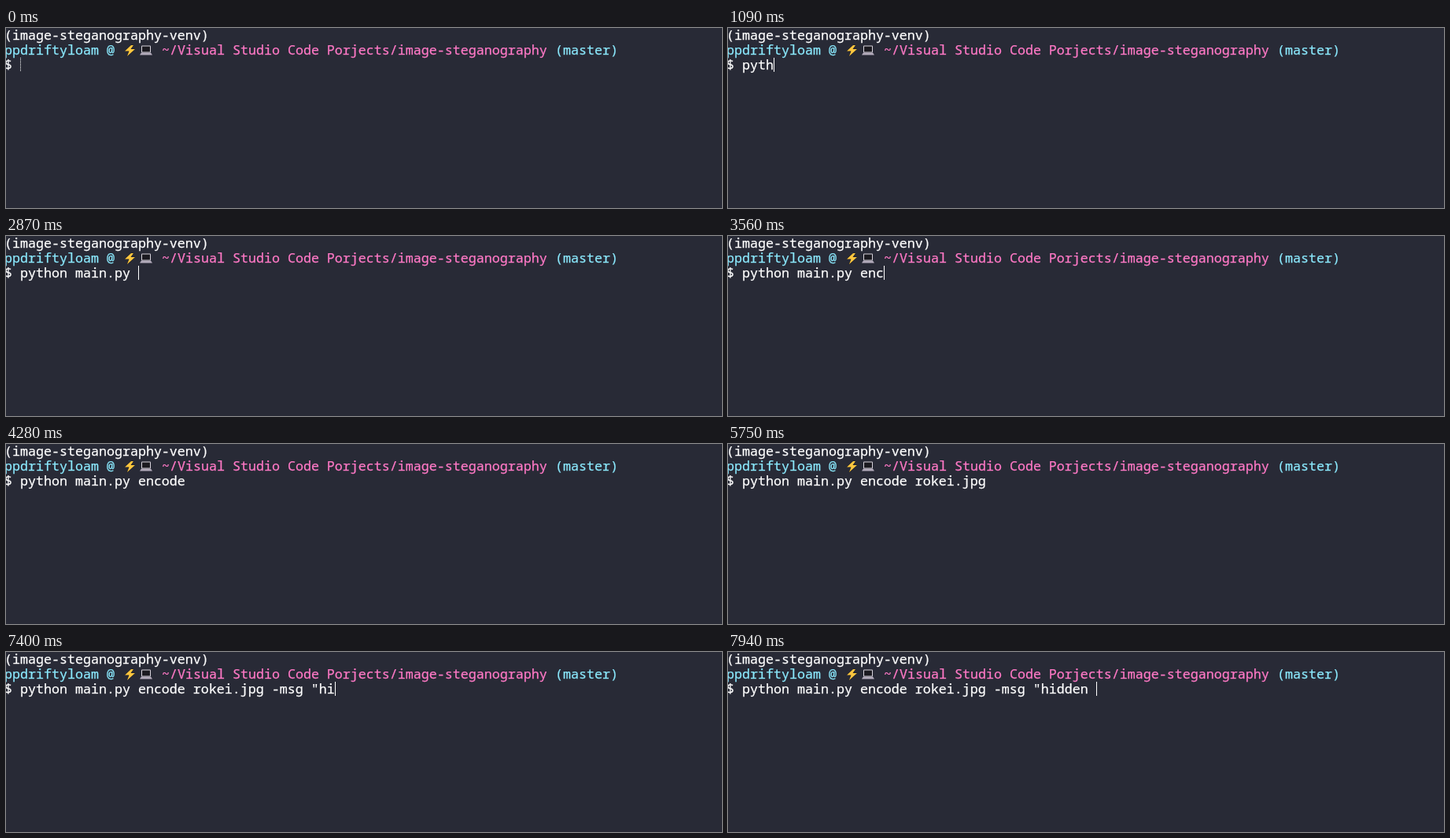
Write an HTML page that moves like this. It is 910x230 px and loops after 8 s.

```html
<!DOCTYPE html>
<html lang="en">
<head>
<meta charset="utf-8">
<title>Terminal</title>
<style>
  html, body { margin: 0; width: 100%; height: 100%; overflow: hidden; background: #282a36; }
  svg { display: block; width: 910px; height: 230px; }
  text {
    font: 16.667px "Noto Sans Mono", "DejaVu Sans Mono", monospace;
    white-space: pre;
    fill: currentColor;
    stroke: currentColor;
    stroke-width: .25px;
    color: #fff;
  }
  .cyan { color: #8be9fd; }
  .pink { color: #ff79c6; }
</style>
</head>
<body>
<svg viewBox="0 0 910 230">
  <rect width="910" height="230" fill="#282a36"/>
  <text x="-2" y="15">(image-steganography-venv)</text>
  <text x="-2" y="34" class="cyan">ppdriftyloam @</text>
  <path d="M159 22 L151 29.5 H156.5 L154 36 L164 27 H158.5 L162 22Z"
        fill="#fcc63f" stroke="#1b1a20" paint-order="stroke"/>
  <g>
    <rect x="172" y="22.5" width="12" height="9" rx="1" fill="#d8d4dc"/>
    <rect x="173" y="23.5" width="10" height="7" fill="#1b1a20"/>
    <path d="M172 31.5 H184 L186 34.5 H170Z" fill="#b4acbc"/>
  </g>
  <text x="198" y="34" class="pink">~/Visual Studio Code Porjects/image-steganography</text>
  <text x="698" y="34" class="cyan">(master)</text>
  <text id="line" x="-2" y="53"></text>
  <path id="caret" d="M.5 38V56" stroke="#fff"/>
</svg>
<script>
const LOOP = 8000, CELL = 10, LEFT = -2, PROMPT = '$ ';
const IDLE = 400, OFF = 330, ON = 230; // caret blink after the last key

// Bursts of keys, evenly spaced from the first to the last; tab completion lands at once.
const BURSTS = [
  ['pyth', 640, 1090], ['on ', 1200, 1440], ['main', 1590, 1830], ['.py ', 2870, 2870],
  ['en', 2930, 3080], ['code', 3530, 3800], [' ro', 4610, 4730], ['kei.jpg ', 5270, 5270],
  ['-msg', 6170, 6680], [' "', 6830, 6950], ['hid', 7250, 7520], ['den ', 7670, 7940]
];
const keys = BURSTS.flatMap(([text, from, to]) =>
  [...text].map((char, i) => ({ char, time: from + (to - from) * i / (text.length - 1) })));

const line = document.getElementById('line');
const caret = document.getElementById('caret');

function caretOn(idle) {
  return idle < IDLE || (idle - IDLE) % (OFF + ON) >= OFF;
}

function draw(t) {
  const typed = keys.filter(key => key.time <= t);
  const last = typed.length ? typed.at(-1).time : 0;
  const text = PROMPT + typed.map(key => key.char).join('');
  line.textContent = text;
  caret.setAttribute('transform', `translate(${LEFT + text.length * CELL} 0)`);
  caret.setAttribute('opacity', caretOn(t - last) ? 1 : 0);
  caret.setAttribute('stroke-dasharray', typed.length ? 'none' : '1 1');
}

const start = performance.now();
function tick() {
  draw((performance.now() - start) % LOOP);
  requestAnimationFrame(tick);
}
tick();
</script>
</body>
</html>
```
